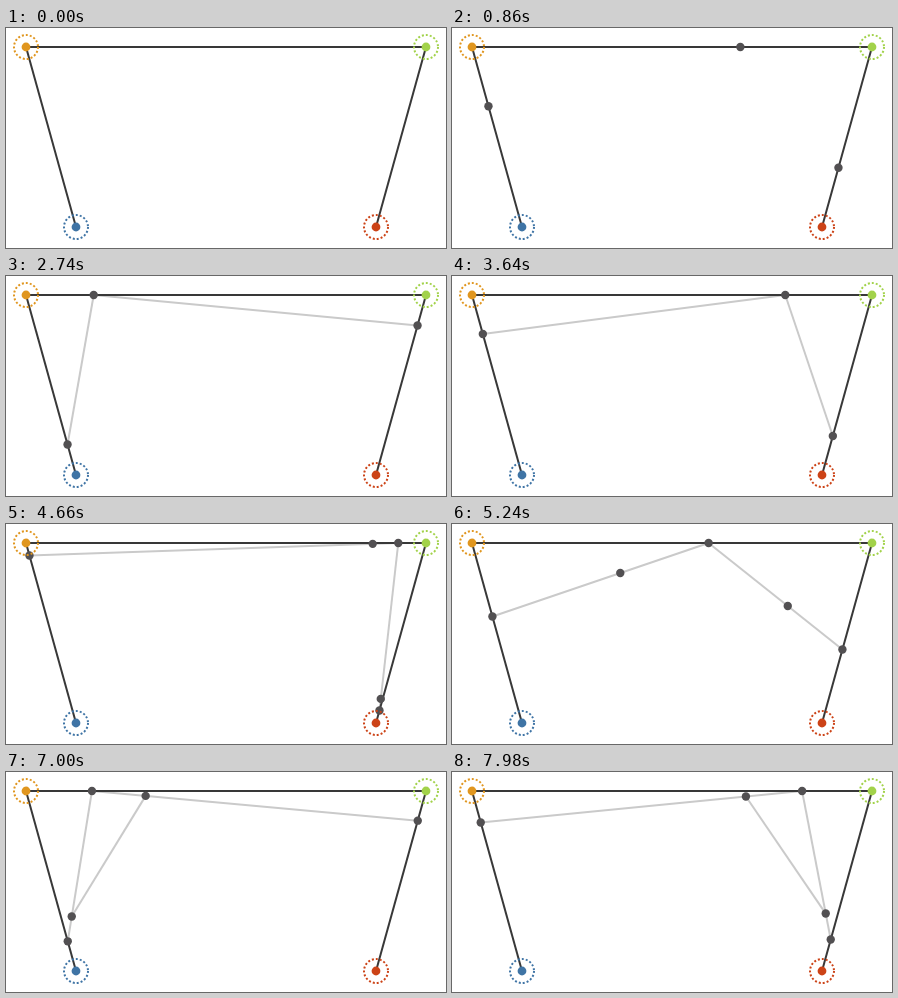
Recreate the animation shown at these times as an HTML page. Size 440x220 px, loop 8 s.

```html
<!DOCTYPE html>
<html lang="en">
<head>
<meta charset="utf-8">
<title>Bézier construction</title>
<style>
  html, body { margin: 0; width: 100%; height: 100%; overflow: hidden; background: #fff; }
  svg { display: block; width: 440px; height: 220px; }
  line { stroke-width: 2; }
  .base { stroke: #383838; }
  .link { stroke: #cacaca; }
  .dot { fill: #525052; }
  .ring { fill: none; stroke-width: 2; stroke-dasharray: 2 2; }
</style>
</head>
<body>
<svg id="stage" viewBox="0 0 440 220"></svg>
<script>
const LOOP = 8000;
const HALF = 2134;   // one sweep between the ends
const START = 31;    // moment when the points reach the far end
const controls = [
  { x: 70, y: 199, color: '#3f74a5' },
  { x: 20, y: 19, color: '#e0961f' },
  { x: 420, y: 19, color: '#a2d24a' },
  { x: 370, y: 199, color: '#cc4317' }
];
const stage = document.getElementById('stage');

function add(tag, attrs) {
  const el = document.createElementNS('http://www.w3.org/2000/svg', tag);
  set(el, attrs);
  stage.appendChild(el);
  return el;
}

function set(el, attrs) {
  for (const key in attrs) el.setAttribute(key, attrs[key]);
}

const ends = (a, b) => ({ x1: a.x, y1: a.y, x2: b.x, y2: b.y });
const at = p => ({ cx: p.x, cy: p.y });
const show = (el, on) => { el.style.display = on ? '' : 'none'; };

const repeat = (n, make) => Array.from({ length: n }, make);
const links = [2, 1].map(n => repeat(n, () => add('line', { class: 'link' })));
controls.slice(1).forEach((p, i) => add('line', { class: 'base', ...ends(controls[i], p) }));
const dots = [3, 2].map(n => repeat(n, () => add('circle', { class: 'dot', r: 4.2 })));
for (const p of controls) {
  add('circle', { class: 'ring', r: 12, stroke: p.color, ...at(p) });
  add('circle', { r: 4.4, fill: p.color, ...at(p) });
}

// Points at fraction t of each segment
function reduce(points, t) {
  return points.slice(1).map((b, i) => {
    const a = points[i];
    return { x: a.x + (b.x - a.x) * t, y: a.y + (b.y - a.y) * t };
  });
}

function draw(ms) {
  const sweep = (ms - START) / HALF;
  const t = (1 + Math.cos(Math.PI * sweep)) / 2;
  let points = controls;
  dots.forEach((row, level) => {
    points = reduce(points, t);
    row.forEach((dot, i) => {
      set(dot, at(points[i]));
      show(dot, sweep >= level * 2);
    });
    links[level].forEach((link, i) => {
      set(link, ends(points[i], points[i + 1]));
      show(link, sweep >= level * 2 + 1);
    });
  });
}

const begin = performance.now();
function tick() {
  draw((performance.now() - begin) % LOOP);
  requestAnimationFrame(tick);
}
draw(0);
requestAnimationFrame(tick);
</script>
</body>
</html>
```
